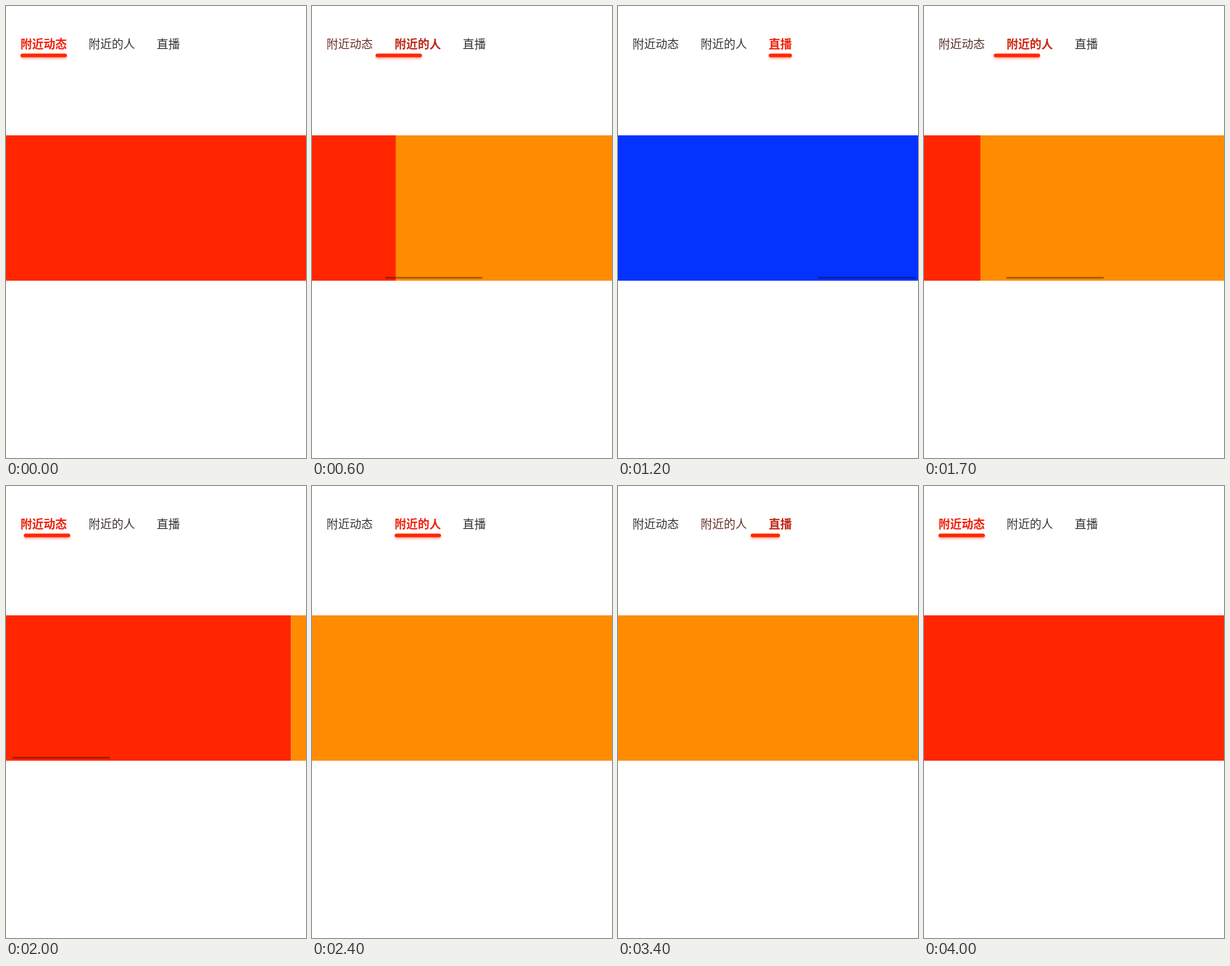
Recreate the animation shown at these times as an HTML page. Size 414x622 px, loop 5 s.

```html
<!DOCTYPE html>
<html lang="zh-CN">
<head>
<meta charset="utf-8">
<style>
html, body { margin: 0; width: 100%; height: 100%; overflow: hidden; background: #fff; }
svg { display: block; width: 414px; height: 622px; }
text { font: 16px "Noto Sans CJK SC", "Noto Sans CJK", sans-serif; }
#bar { filter: drop-shadow(0 2px 1.5px rgba(255, 38, 0, .4)); }
</style>
</head>
<body>
<svg viewBox="0 0 414 622">
  <g id="tabs">
    <text x="20" y="58">附近动态</text>
    <text x="114" y="58">附近的人</text>
    <text x="208" y="58">直播</text>
  </g>
  <rect id="bar" y="65.5" height="5" rx="2.5" fill="#ff2600"/>
  <g id="pages">
    <rect y="178" width="414" height="200" fill="#ff2600"/>
    <rect x="414" y="178" width="414" height="200" fill="#ff8c00"/>
    <rect x="828" y="178" width="414" height="200" fill="#0433ff"/>
  </g>
  <rect id="scroll" y="372.7" width="135" height="2.6" rx="1.3" fill="#000"/>
</svg>
<script>
const LOOP = 5000, TICK = 100, WIDTH = 414;
const tabs = [{ x: 20, w: 64 }, { x: 114, w: 64 }, { x: 208, w: 32 }];
const idle = [51, 51, 51], active = [240, 32, 8];

// Swipes drag the pages; taps switch the page at once and only slide the bar.
const moves = [
  { start: 0, end: 930, from: 0, to: 1 },
  { start: 930, end: 1200, from: 1, to: 2 },
  { start: 1200, end: 1600, from: 2, to: 1 },
  { start: 1600, end: 1950, from: 1, to: 0 },
  { start: 1950, end: 2300, from: 0, to: 1 },
  { start: 2900, end: 3100, from: 1, to: 2, tap: true },
  { start: 3314, end: 3564, from: 2, to: 1, tap: true },
  { start: 3714, end: 3964, from: 1, to: 0, tap: true }
];

const $ = id => document.getElementById(id);
const labels = [...$("tabs").children];
const lerp = (a, b, k) => a + (b - a) * k;
const ease = k => (1 - Math.cos(Math.PI * k)) / 2;

function stateAt(t) {
  const move = moves.filter(m => t > m.start).pop();
  if (!move) return { pos: 0, page: 0, shade: 0 };
  const pos = lerp(move.from, move.to, ease(Math.min(1, (t - move.start) / (move.end - move.start))));
  const shade = !move.tap && t < 2400 ? 0.35 : 0;
  return { pos, page: move.tap ? move.to : pos, shade };
}

function draw(t) {
  const { pos, page, shade } = stateAt(t);
  const i = Math.min(1, Math.floor(pos)), k = pos - i;
  $("bar").setAttribute("x", lerp(tabs[i].x, tabs[i + 1].x, k));
  $("bar").setAttribute("width", lerp(tabs[i].w, tabs[i + 1].w, k));
  labels.forEach((label, n) => {
    const near = Math.max(0, 1 - Math.abs(pos - n));
    const rgb = idle.map((c, j) => Math.round(lerp(c, active[j], near)));
    label.setAttribute("fill", `rgb(${rgb})`);
    label.style.fontWeight = near > 0.5 ? 700 : 400;
  });
  $("pages").setAttribute("transform", `translate(${-page * WIDTH} 0)`);
  $("scroll").setAttribute("x", 2 + page * 137);
  $("scroll").setAttribute("opacity", shade);
}

const begin = performance.now();
function frame() {
  const t = (performance.now() - begin) % LOOP;
  draw(Math.floor(t / TICK) * TICK);
  requestAnimationFrame(frame);
}
draw(0);
requestAnimationFrame(frame);
</script>
</body>
</html>
```
